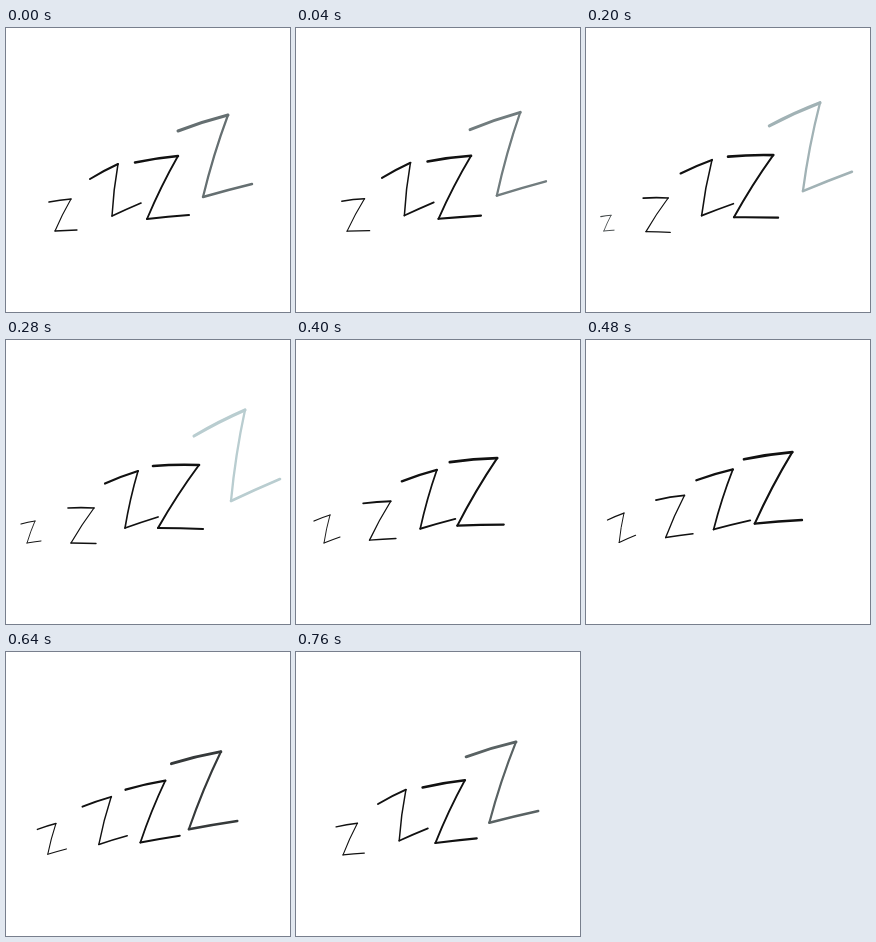
Animation, 284 px wide and 284 px high, one loop 0.8 s. Source, as an HTML page with a canvas:

```html
<!DOCTYPE html>
<html lang="en">
<head>
<meta charset="utf-8">
<title>Zzz</title>
<style>
html, body { margin: 0; height: 100%; overflow: hidden; background: #fff; }
canvas { display: block; width: 100vw; height: 100vh; }
</style>
</head>
<body>
<canvas id="stage" width="284" height="284"></canvas>
<script>
const LOOP = 800, STEP = 40, BIRTH = 120, END = 3480;
const ctx = document.getElementById('stage').getContext('2d');

// Age in ms, then the four corners of the letter in writing order.
const poses = [
  [120, 15, 194, 21, 194, 15, 203, 21, 203],
  [280, 15, 184, 29, 181, 21, 203, 35, 201],
  [400, 18, 181, 34, 175, 28, 203, 44, 197],
  [560, 26, 179, 43, 172, 38, 202, 55, 195],
  [800, 43, 174, 65, 171, 49, 203, 71, 202],
  [1080, 62, 168, 88, 168, 65, 203, 90, 203.5],
  [1360, 73, 157, 102, 150, 86, 195, 114, 189],
  [1600, 84, 151, 112, 136, 106, 188, 135, 175],
  [1880, 99, 143.5, 132, 131, 119, 188, 152, 177],
  [2160, 115, 139, 153, 129, 131, 190, 169, 182],
  [2400, 129, 134.5, 172, 128, 141, 191, 183, 187],
  [2680, 147, 126, 193, 125, 152, 188, 197, 189],
  [2960, 162, 116, 211, 106, 176, 181, 224, 175],
  [3200, 172, 103, 222, 87, 197, 169, 246, 156],
  [3480, 188, 96, 239, 70, 225, 161, 274, 139]
];

const clamp = v => Math.max(0, Math.min(1, v));
const mix = (a, b, k) => a + (b - a) * k;

function slope(i, c) {
  const a = poses[Math.max(0, i - 1)], b = poses[Math.min(poses.length - 1, i + 1)];
  return (b[c] - a[c]) / (b[0] - a[0]);
}

// Cubic Hermite interpolation between neighbouring poses.
function poseAt(age) {
  let i = 0;
  while (i < poses.length - 2 && age >= poses[i + 1][0]) i++;
  const a = poses[i], b = poses[i + 1], span = b[0] - a[0];
  const k = (age - a[0]) / span, e = k * k * (3 - 2 * k);
  return a.slice(1).map((v, n) => mix(v, b[n + 1], e) + span * k * (1 - k) *
    ((1 - k) * slope(i, n + 1) - k * slope(i + 1, n + 1)));
}

function stroke(x1, y1, x2, y2, width, bow) {
  ctx.lineWidth = width;
  ctx.beginPath();
  ctx.moveTo(x1, y1);
  ctx.quadraticCurveTo((x1 + x2) / 2 + (y2 - y1) * bow, (y1 + y2) / 2 - (x2 - x1) * bow, x2, y2);
  ctx.stroke();
}

function drawLetter(age) {
  const [ax, ay, bx, by, cx, cy, dx, dy] = poseAt(age);
  const fade = Math.max(clamp((age - 2920) / 560), 0.6 * clamp((280 - age) / 160));
  const width = 0.9 + age / 1900;
  ctx.strokeStyle = `rgb(${[185, 205, 208].map(v => Math.round(mix(17, v, fade)))})`;
  stroke(ax, ay, bx, by, width * 1.15, 0.03);
  stroke(bx, by, cx, cy, width * 0.85, -0.03);
  stroke(cx, cy, dx, dy, width * 0.95, 0.01);
}

function draw() {
  const time = Math.floor(performance.now() % LOOP / STEP) * STEP;
  ctx.clearRect(0, 0, 284, 284);
  ctx.lineCap = ctx.lineJoin = 'round';
  for (let age = time; age <= END; age += LOOP) {
    if (age >= BIRTH) drawLetter(age);
  }
  requestAnimationFrame(draw);
}
draw();
</script>
</body>
</html>
```
